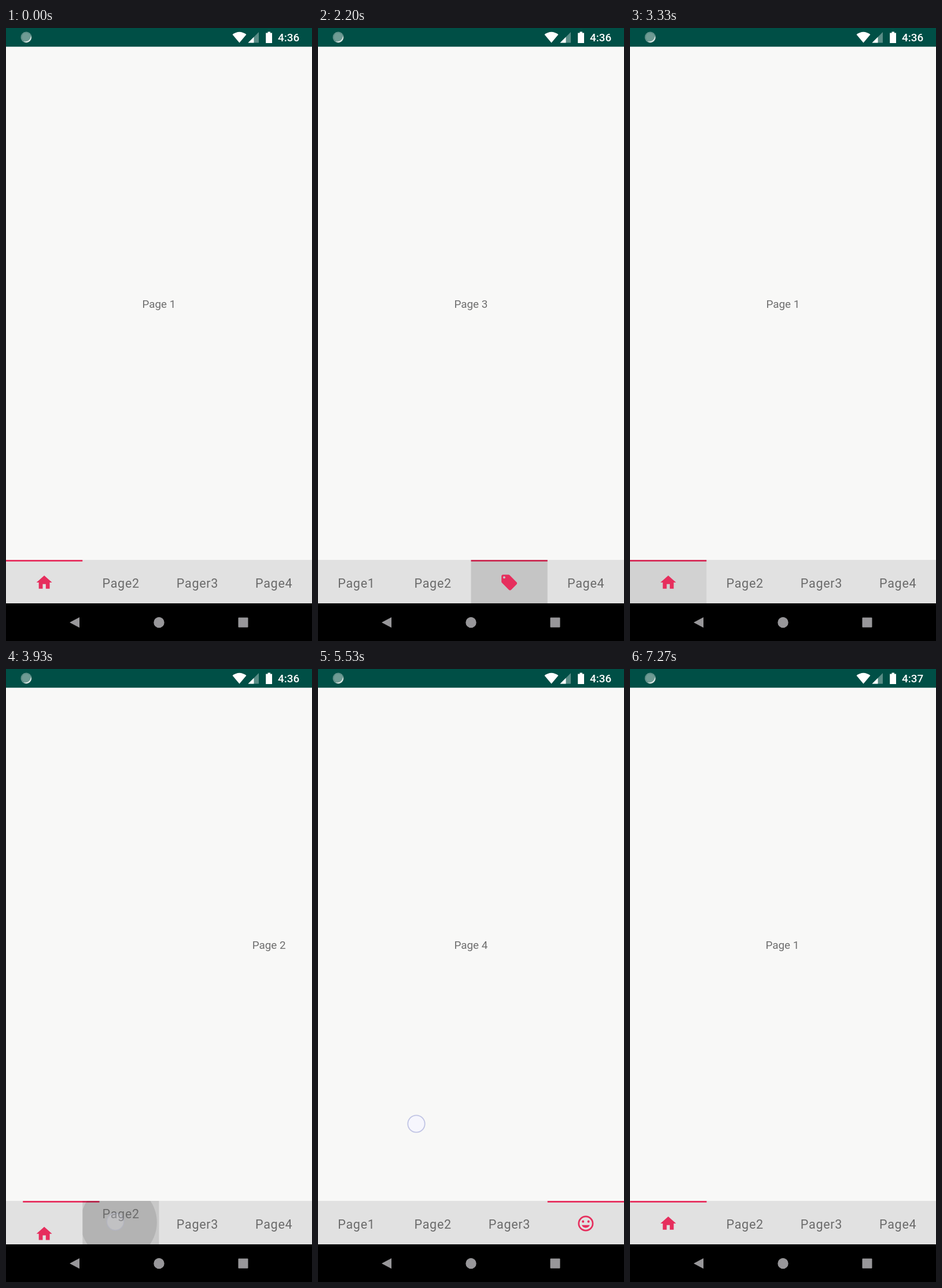
Recreate the animation shown at these times as an HTML page. Size 529 by 1058 pixels, loop 7.34 s.

```html
<!DOCTYPE html>
<html lang="en">
<head>
<meta charset="utf-8">
<title>Tab pager</title>
<style>
  html, body { margin: 0; height: 100%; overflow: hidden; background: #f8f8f7; }
  svg { display: block; width: 100vw; height: 100vh; font-family: Roboto, sans-serif; }
  .page { font-size: 18.86px; fill: #6e6e6e; text-anchor: middle; }
  .label { font-size: 21.55px; letter-spacing: .67px; fill: #6b6b6b; text-anchor: middle; }
  .accent { fill: #e62e5d; }
  .clock { font-size: 18.9px; font-weight: 500; fill: #fff; }
</style>
</head>
<body>
<svg viewBox="0 0 529 1058" preserveAspectRatio="none">
  <defs>
    <clipPath id="barClip"><rect y="918" width="529" height="75"/></clipPath>
    <clipPath id="rippleClip"><rect id="rippleBox" y="918" width="132.25" height="75"/></clipPath>
  </defs>
  <rect width="529" height="1058" fill="#f8f8f7"/>
  <g id="pages"></g>

  <rect y="918" width="529" height="75" fill="#e1e1e1"/>
  <rect id="line" class="accent" y="918" width="132.25" height="2.8"/>
  <g id="ripple" clip-path="url(#rippleClip)">
    <rect y="918" width="529" height="75" fill-opacity=".11"/>
    <circle id="wave" fill-opacity=".105"/>
  </g>
  <g id="tabs" clip-path="url(#barClip)"></g>

  <rect width="529" height="32.3" fill="#004f46"/>
  <circle cx="35" cy="16" r="8" fill="#6f9b94"/>
  <circle cx="35" cy="16" r="8.7" fill="none" stroke="#a5c0bb" stroke-width="1.4" stroke-dasharray="1.2 .8"/>
  <path d="M43 13A8.5 8.5 0 0 1 30 23A10 10 0 0 0 43 13Z" fill="#e3ecea"/>
  <path d="M391.5 11.2Q403.5 2.2 415.5 11.2L403.5 25.5Z" fill="#fff"/>
  <path d="M437 7V25.5H418.5Z" fill="#fff" fill-opacity=".35"/>
  <path d="M428.5 15.5V25.5H418.5Z" fill="#fff"/>
  <path d="M452.5 6.5h4.5v2h3v17.5h-10.8v-17.5h3.3z" fill="#fff"/>
  <text id="clock" class="clock" x="470" y="23.2"></text>

  <rect y="993" width="529" height="65"/>
  <g fill="#98979a">
    <path d="M110 1026L127 1017V1035Z"/>
    <circle cx="264.5" cy="1026" r="9.2"/>
    <rect x="401.5" y="1017.5" width="17" height="17" rx="1"/>
  </g>

  <g id="touch">
    <circle r="14.7" fill="#f6f6ff" fill-opacity=".74" stroke="#aeb3dc" stroke-opacity=".75" stroke-width="1.8"/>
  </g>
</svg>
<script>
const LOOP = 7340, W = 529, TAB = W / 4, SLIDE = 300;
const $ = id => document.getElementById(id);
const clamp = v => Math.min(1, Math.max(0, v));
const mix = (a, b, k) => a + (b - a) * k;
const quint = u => 1 - (1 - clamp(u)) ** 5;

// cubic-bezier(.4, 0, .2, 1)
function standard(x) {
  x = clamp(x);
  let lo = 0, hi = 1;
  for (let i = 0; i < 20; i++) {
    const s = (lo + hi) / 2, r = 1 - s;
    if (1.2 * r * r * s + .6 * r * s * s + s ** 3 < x) lo = s; else hi = s;
  }
  return lo * lo * (3 - 2 * lo);
}

const names = ['Page1', 'Page2', 'Pager3', 'Page4'];
const icons = [
  'M10 20v-6h4v6h5v-8h3L12 3 2 12h3v8z',
  'M12 21.35l-1.45-1.32C5.4 15.36 2 12.28 2 8.5 2 5.42 4.42 3 7.5 3c1.74 0 3.41.81 4.5 2.09C13.09 3.81 14.76 3 16.5 3 19.58 3 22 5.42 22 8.5c0 3.78-3.4 6.86-8.55 11.54z',
  'M21.41 11.58l-9-9C12.05 2.22 11.55 2 11 2H4c-1.1 0-2 .9-2 2v7c0 .55.22 1.05.59 1.42l9 9c.36.36.86.58 1.41.58s1.05-.22 1.41-.59l7-7c.37-.36.59-.86.59-1.41s-.23-1.06-.59-1.42zM5.5 7a1.5 1.5 0 1 1 0-3 1.5 1.5 0 0 1 0 3z',
  'M12 2a10 10 0 1 0 0 20 10 10 0 0 0 0-20zm0 18a8 8 0 1 1 0-16 8 8 0 0 1 0 16zm3.5-9a1.5 1.5 0 1 0 0-3 1.5 1.5 0 0 0 0 3zm-7 0a1.5 1.5 0 1 0 0-3 1.5 1.5 0 0 0 0 3zM12 17.5c2.33 0 4.31-1.46 5.11-3.5H6.89c.8 2.04 2.78 3.5 5.11 3.5z'
];

// Taps jump to a tab; swipes drag the finger dx pixels to the right.
const moves = [
  { down: 1725, lift: 1850, x: 308, y: 948, to: 2, lag: 60 },
  { down: 2765, lift: 2880, x: 110.5, y: 953, to: 0, lag: 60 },
  { down: 3760, lift: 3858, x: 189, y: 954, to: 1, lag: 36 },
  { down: 4640, lift: 4746, x: 456, y: 967, to: 3, lag: 78 },
  { down: 5525, lift: 5690, x: 170, y: 785, to: 2, dx: 240, settle: 450 },
  { down: 6205, lift: 6390, x: 189, y: 782, to: 1, dx: 240, settle: 420 },
  { down: 6785, lift: 6930, x: 180, y: 780, to: 0, dx: 240, settle: 500 }
];
moves.forEach((m, i) => m.from = i ? moves[i - 1].to : 0);

const SVG = 'http://www.w3.org/2000/svg';
function add(parent, tag, cls, content) {
  const el = document.createElementNS(SVG, tag);
  el.setAttribute('class', cls);
  if (tag === 'text') el.textContent = content; else el.setAttribute('d', content);
  return $(parent).appendChild(el);
}
const pages = names.map((_, i) => add('pages', 'text', 'page', 'Page ' + (i + 1)));
const labels = names.map(n => add('tabs', 'text', 'label', n));
const glyphs = icons.map(d => add('tabs', 'path', 'accent', d));

const set = (el, attrs) => { for (const k in attrs) el.setAttribute(k, attrs[k]); };

const fingerX = (m, t) => m.dx ? m.dx * clamp((t - m.down - 65) / (m.lift - m.down - 65)) ** 2 : 0;

function pagePos(m, t) {
  if (!m.dx) {
    const time = 100 * (Math.abs(m.to - m.from) + 1);
    return mix(m.from, m.to, quint((t - m.lift - m.lag) / time));
  }
  const dragged = m.from - Math.max(0, fingerX(m, t) - 8) / W;
  return mix(dragged, m.to, quint((t - m.lift) / m.settle));
}

function drawRipple(m, t) {
  const age = t - m.lift, on = !m.dx && age > -25 && age < 580;
  $('ripple').style.display = on ? '' : 'none';
  if (!on) return;
  const grow = 1 - (1 - clamp(age / 190)) ** 2;
  set($('rippleBox'), { x: m.to * TAB });
  set($('wave'), {
    cx: mix(m.x, (m.to + .5) * TAB, grow),
    cy: mix(m.y, 955.5, grow),
    r: mix(40, 82, grow)
  });
  set($('ripple'), { opacity: clamp((age + 25) / 60) * (1 - clamp((age - 200) / 380)) });
}

function drawTouch(m, t) {
  const alpha = t < m.down ? 0 : Math.exp(-Math.max(0, t - m.lift) / 60);
  set($('touch'), {
    opacity: alpha < .03 ? 0 : alpha,
    transform: `translate(${m.x + fingerX(m, t)} ${m.y})`
  });
}

function draw(t) {
  let m = moves[0];
  for (const next of moves) if (t >= next.down) m = next;

  const pos = pagePos(m, t);
  pages.forEach((p, i) => set(p, { x: 264.4 + (i - pos) * W, y: 482.7 }));

  const k = clamp((t - m.lift) / SLIDE);
  const line = m.dx ? pos : mix(m.from, m.to, standard(k));
  set($('line'), { x: line * TAB });

  names.forEach((_, i) => {
    const sel = i === m.to ? k : i === m.from ? 1 - k : 0;
    const cx = (i + .5) * TAB;
    set(labels[i], { x: cx + .3, y: 965.8 - 75 * sel });
    set(glyphs[i], { transform: `translate(${cx} ${957 + 73 * (1 - sel)}) scale(1.347) translate(-12 -12)` });
  });

  drawRipple(m, t);
  drawTouch(m, t);
  $('clock').textContent = t < 5870 ? '4:36' : '4:37';
}

function frame() {
  draw(performance.now() % LOOP);
  requestAnimationFrame(frame);
}
frame();
</script>
</body>
</html>
```
